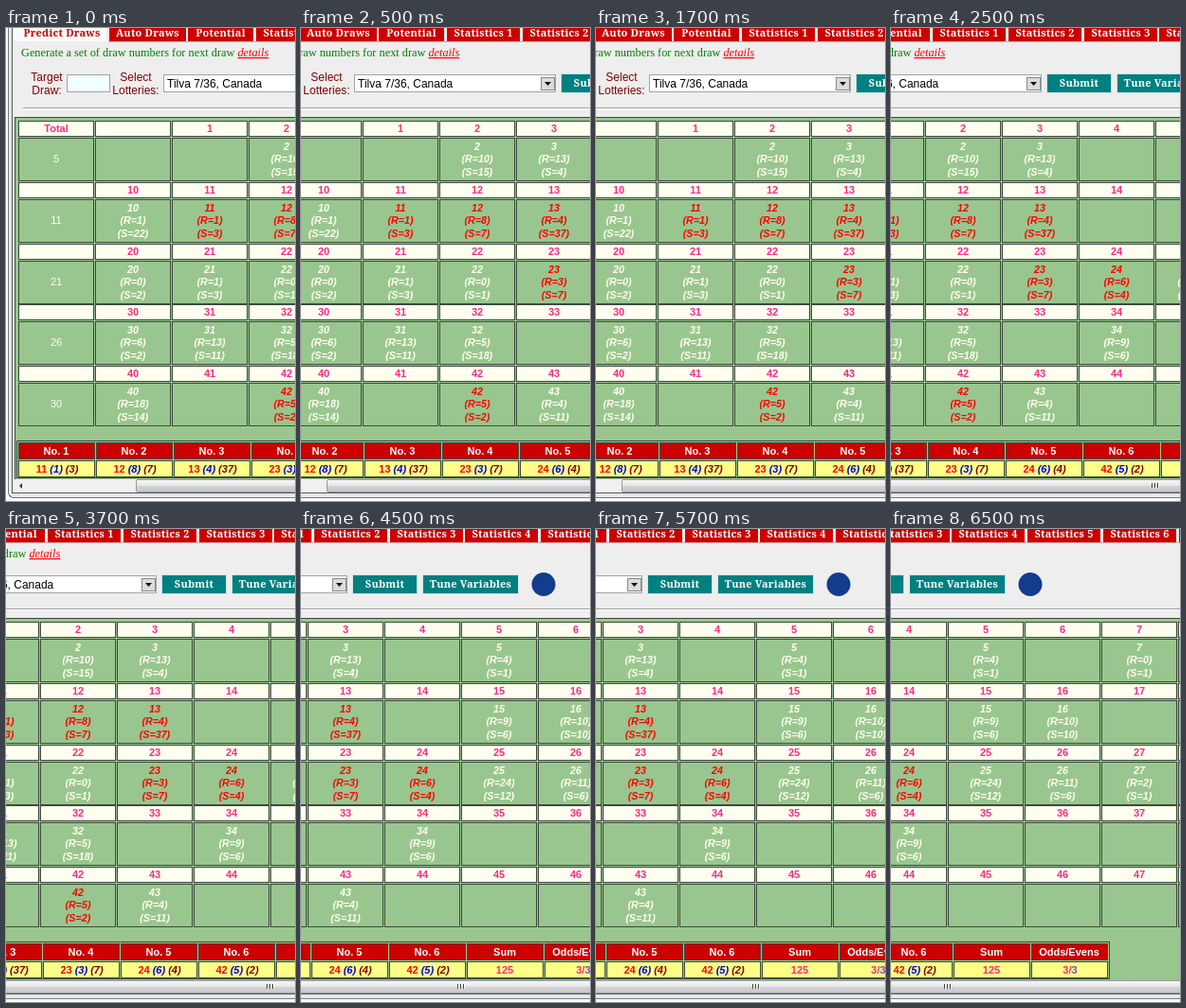
Recreate the animation shown at these times as an HTML page. Size 305 by 500 pixels, loop 8000 ms.

```html
<!DOCTYPE html>
<html lang="en">
<head>
<meta charset="utf-8">
<title>Draw numbers</title>
<style>
html, body { margin: 0; width: 100%; height: 100%; overflow: hidden; background: #fff; }
svg { position: absolute; left: 0; top: 0; width: 305px; height: 500px; overflow: hidden; }
rect { shape-rendering: crispEdges; }
text { font: 11px "Liberation Sans", Arial, sans-serif; text-anchor: middle; white-space: pre; }
.tab { font: 700 11px "Noto Serif", serif; letter-spacing: .2px; }
.intro { font: 12.3px "Liberation Serif", serif; text-anchor: start; }
.label { font-size: 12px; fill: #800000; }
.option { font-size: 12px; text-anchor: start; }
.bold { font-weight: 700; }
.pick { font-size: 10.7px; font-weight: 700; font-style: italic; }
.i { font-style: italic; }
.u { font-style: italic; text-decoration: underline; }
</style>
</head>
<body>
<svg viewBox="0 0 305 500">
  <defs>
    <linearGradient id="thumb" x2="0" y2="1">
      <stop offset="0" stop-color="#f8f8f8"/>
      <stop offset=".48" stop-color="#e6e6e8"/>
      <stop offset=".52" stop-color="#d2d3d6"/>
      <stop offset="1" stop-color="#c6c7ca"/>
    </linearGradient>
  </defs>
  <g id="view"></g>
</svg>
<script>
const view = document.getElementById('view');
const RED = '#cc0000', GREEN = '#99c68e', IVORY = '#fffff0', PINK = '#ff2a7f',
      TEAL = '#008080', EDGE = '#3c4a3c', PAGE = '#eeeeee', HOT = '#ff0000';

function add(tag, attrs, parent = view) {
  const el = document.createElementNS('http://www.w3.org/2000/svg', tag);
  for (const k in attrs) el.setAttribute(k, attrs[k]);
  return parent.appendChild(el);
}
const box = (x, y, width, height, fill) => add('rect', { x, y, width, height, fill });
function framed(x, y, w, h, fill, edge = EDGE) {
  box(x, y, w, h, edge);
  box(x + 1, y + 1, w - 2, h - 2, fill);
}
function label(str, x, y, cls, fill) {
  const el = add('text', { x, y, class: cls, fill });
  el.textContent = str;
  return el;
}
function runs(x, y, cls, parts) {
  const el = add('text', { x, y, class: cls });
  for (const [str, fill, style = ''] of parts)
    add('tspan', { fill, class: style }, el).textContent = str;
}

function drawWindow() {
  add('rect', { x: 2.5, y: -20, width: 1000, height: 516.5, rx: 6, fill: '#e6e8eb', stroke: '#777' });
  box(6, 0, 1000, 492, '#55585c');
  box(7, 0, 1000, 491, PAGE);
}

function drawTabs() {
  box(8, 0, 98, 14, '#fafafa');
  label('Predict Draws', 59, 9, 'tab', RED);
  const tabs = [['Auto Draws', 109, 81], ['Potential', 192, 69]];
  for (let i = 0; i < 7; i++) tabs.push(['Statistics ' + (i + 1), Math.round(264 + 79.8 * i), 77]);
  for (const [name, x, w] of tabs) {
    box(x, 0, w, 14, RED);
    label(name, x + w / 2, 9, 'tab', '#fff');
  }
  box(108, 14, 800, 1, '#d9a0a0');
}

function drawForm() {
  runs(16, 30, 'intro', [['Generate a set of draw numbers for next draw ', '#008000'], ['details', HOT, 'u']]);
  label('Target', 43, 56, 'label');
  label('Draw:', 43, 70, 'label');
  label('Select', 137, 56, 'label');
  label('Lotteries:', 137, 70, 'label');
  framed(64, 49, 46, 19, '#f0ffff', '#9aa4ae');
  framed(166, 49, 213, 19, '#fff', '#9aa4ae');
  label('Tilva 7/36, Canada', 170, 63, 'option', '#000');
  framed(363, 52, 15, 14, '#dcdcdc', '#888');
  add('path', { d: 'M367 57h7l-3.5 4z', fill: '#111' });
  for (const [name, x, w] of [['Submit', 384, 69], ['Tune Variables', 458, 102]]) {
    framed(x, 48, w, 21, TEAL, '#d4e2e2');
    label(name, x + w / 2, 62, 'tab', '#fff');
  }
  add('circle', { cx: 586, cy: 58.5, r: 12.5, fill: '#123c8c' });
  box(18, 84, 900, 1, '#a0a0a0');
  box(18, 85, 900, 1, '#fff');
}

// number: [R, S, highlighted]
const picks = {
  2: [10, 15], 3: [13, 4], 5: [4, 1], 7: [0, 1],
  10: [1, 22], 11: [1, 3, 1], 12: [8, 7, 1], 13: [4, 37, 1], 15: [9, 6], 16: [10, 10],
  20: [0, 2], 21: [1, 3], 22: [0, 1], 23: [3, 7, 1], 24: [6, 4, 1], 25: [24, 12], 26: [11, 6], 27: [2, 1],
  30: [6, 2], 31: [13, 11], 32: [5, 18], 34: [9, 6],
  40: [18, 14], 42: [5, 2, 1], 43: [4, 11]
};
const totals = [5, 11, 21, 26, 30];

function drawGrid() {
  box(9, 94, 900, 383, EDGE);
  box(10, 95, 900, 382, GREEN);
  totals.forEach((total, row) => {
    const dy = Math.round(64.8 * row);
    for (let col = 0; col < 10; col++) {
      const x = 13 + 81 * col, mid = x + 40, n = row * 10 + col - 1;
      framed(x, 98 + dy, 80, 17, IVORY);
      framed(x, 116 + dy, 80, 46, GREEN);
      if (!col) {
        if (!row) label('Total', mid, 110, 'bold', PINK);
        label(total, mid, 142 + dy, '', IVORY);
        continue;
      }
      if (n) label(n, mid, 110 + dy, 'bold', PINK);
      const p = picks[n];
      if (!p) continue;
      [n, `(R=${p[0]})`, `(S=${p[1]})`].forEach((line, i) =>
        label(line, mid, 129 + dy + Math.round(13.3 * i), 'pick', p[2] ? HOT : IVORY));
    }
  });
}

function drawResult() {
  framed(11, 436, 659, 40, GREEN);
  const drawn = [11, 12, 13, 23, 24, 42];
  const heads = [...drawn.map((_, i) => 'No. ' + (i + 1)), 'Sum', 'Odds/Evens'];
  heads.forEach((head, i) => {
    const x = 13 + 82 * i, mid = x + 40;
    framed(x, 438, 81, 18, RED);
    framed(x, 457, 81, 18, '#ffff88');
    label(head, mid, 451, 'bold', '#fff');
    const n = drawn[i];
    if (n) {
      const [r, s] = picks[n];
      runs(mid + 1, 470, 'bold', [[n, HOT], [` (${r})`, '#0000dd', 'i'], [` (${s})`, '#800000', 'i']]);
    }
  });
  label('125', 545, 470, 'bold', PINK);
  runs(628, 470, 'bold', [['3/', PINK], ['3', '#9040c8']]);
}

function drawScrollbar() {
  box(7, 477, 1000, 14, '#f0f0f0');
  add('path', { d: 'M17 481v6l-3-3z', fill: '#333' });
  add('rect', { x: 137.5, y: 477.5, width: 722, height: 13, rx: 2, fill: 'url(#thumb)', stroke: '#98999c' });
  for (let i = 0; i < 3; i++) {
    box(495 + 3 * i, 481, 1, 5, '#444');
    box(496 + 3 * i, 481, 1, 5, '#fff');
  }
}

drawWindow();
drawTabs();
drawForm();
drawGrid();
drawResult();
drawScrollbar();

// [time in ms, horizontal pan]
const LOOP = 8000;
const pans = [[0, 0], [500, 110], [2500, 220], [4500, 330], [6500, 439], [LOOP, 439]];
view.animate(
  pans.map(([t, x]) => ({ offset: t / LOOP, transform: `translateX(${-x}px)`, easing: 'step-end' })),
  { duration: LOOP, iterations: Infinity }
);
</script>
</body>
</html>
```
